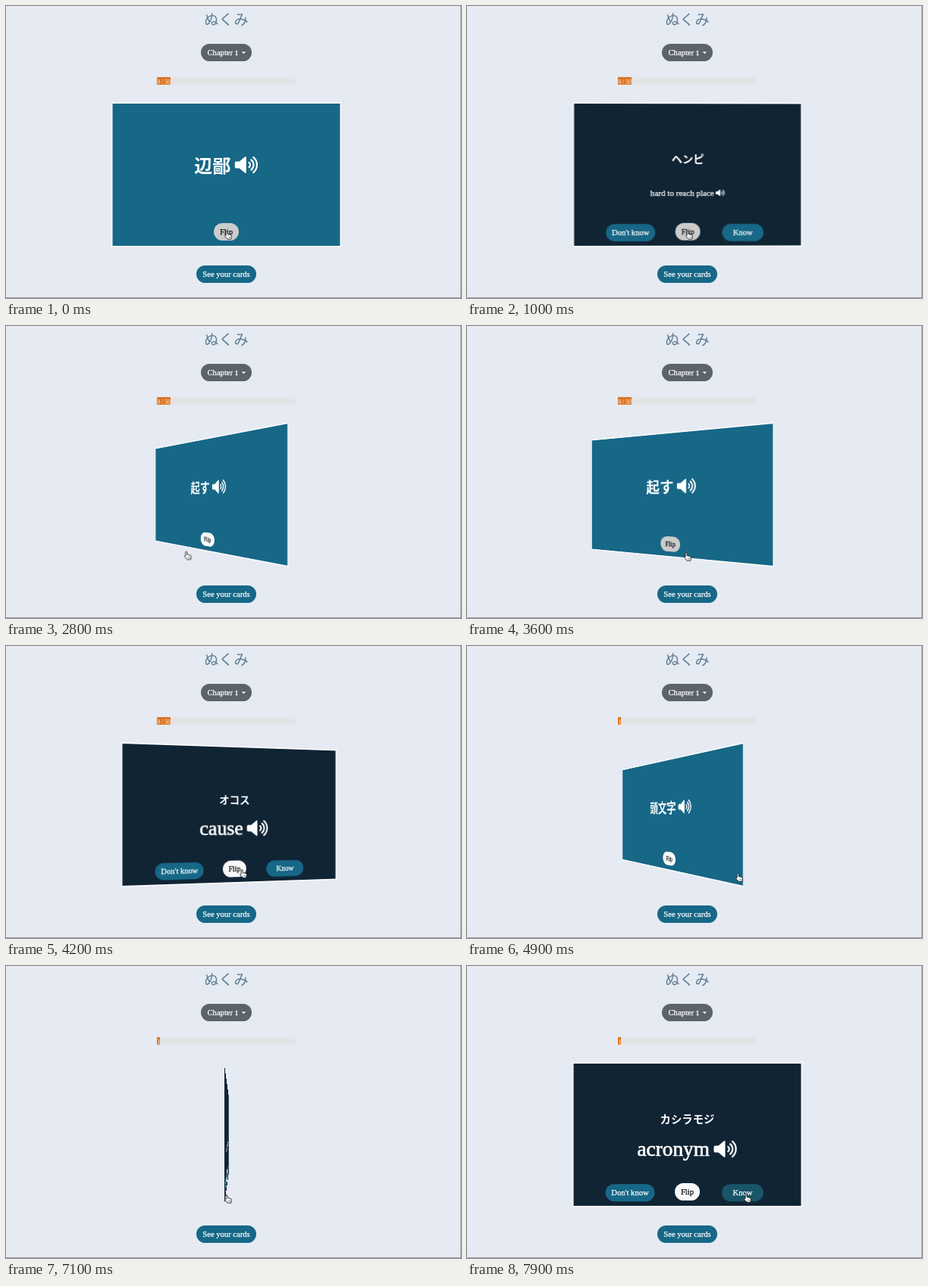
Write an HTML page that moves like this. It is 600 by 386 pixels and loops after 8000 ms.

```html
<!DOCTYPE html>
<html lang="ja">
<head>
<meta charset="utf-8">
<title>Flash cards</title>
<style>
  html, body { margin: 0; width: 100%; height: 100%; overflow: hidden; background: #e6eaf2; }
  .stage { position: absolute; left: 0; top: 0; width: 600px; height: 386px; overflow: hidden; background: #e6eaf2; }
  svg { display: block; }
  .page, .hand { position: absolute; left: 0; top: 0; }
  .hand { overflow: visible; }
  text { font-family: "Liberation Serif", "Times New Roman", serif; }
  .jp { font-family: "Noto Sans CJK JP", "Noto Sans CJK", "Noto Sans", sans-serif; }
  .medium { font-weight: 500; }
  .bold { font-weight: 700; }
  .track { position: absolute; left: 199px; top: 94px; width: 182px; height: 9.6px; background: #e2e4e7; overflow: hidden; }
  .bar { position: relative; width: 18.2px; height: 100%; background: #dd7420; overflow: hidden; }
  .bar span { position: absolute; left: .4px; top: 1.6px; white-space: nowrap; color: #fff; font: 7.6px/9.6px "Liberation Serif", serif; }
  .scene { position: absolute; left: 139px; top: 127px; width: 303px; height: 192px; perspective: 360px; }
  .card { position: absolute; inset: 0; transform-style: preserve-3d; transform-origin: center right; }
  /* A clear margin keeps the white edge crisp while the card turns. */
  .face { position: absolute; inset: -2px; backface-visibility: hidden; }
  .back { transform: rotateY(180deg); }
</style>
</head>
<body>
<div class="stage">
  <svg class="page" id="page" width="600" height="386" viewBox="0 0 600 386">
    <defs>
      <symbol id="speaker" viewBox="0 0 31 24" overflow="visible">
        <path fill="#fff" d="M1.8 7.5H6L13.2 1.4Q15 .3 15 2.4V21.6Q15 23.7 13.2 22.6L6 16.5H1.8Q0 16.5 0 14.7V9.3Q0 7.5 1.8 7.5Z"/>
        <path fill="none" stroke="#fff" stroke-width="2.2" stroke-linecap="round"
          d="M18.8 8.8a4.2 4.2 0 0 1 0 6.4M21.6 5.3a8.7 8.7 0 0 1 0 13.4M24.4 1.9a13.1 13.1 0 0 1 0 20.2"/>
      </symbol>
    </defs>
    <text class="jp medium" x="290.5" y="25.3" font-size="19.2" text-anchor="middle" fill="#5b7d92">ぬくみ</text>
    <path d="M599.5 0V386" stroke="#a5a8ae"/>
    <path d="M0 385.5H600" stroke="#9b9ea4"/>
  </svg>

  <div class="track"><div class="bar" id="bar">
    <span id="count0">0 / 50</span><span id="count1">1 / 50</span>
  </div></div>

  <div class="scene"><div class="card" id="card">
    <div class="face"><svg id="front" width="307" height="196" viewBox="137 125 307 196"></svg></div>
    <div class="face back"><svg id="back" width="307" height="196" viewBox="137 125 307 196"></svg></div>
  </div></div>

  <svg class="hand" id="hand" width="10" height="12" viewBox="0 0 10 12">
    <path fill="#fff" stroke="#222" stroke-width=".9" stroke-linejoin="round"
      d="M2.1 1.6C2.1.3 4.1.3 4.1 1.6V4.6L7.9 5.4Q9.6 5.8 9.4 7.4L8.8 11.2H4.1L.9 7.6C.2 6.6 1.1 5.8 2.1 6.7Z"/>
    <path fill="none" stroke="#444" stroke-width=".5" d="M5 7.6V9.6M6.4 7.6V9.6M7.7 7.6V9.6"/>
  </svg>
</div>

<script>
const LOOP = 8000, FLIP = 960, MID = 290.5;
const TEAL = '#176787', DARK_TEAL = '#185568', NAVY = '#112434';
const PALE = '#f8f9fa', GRAY = '#cbcbcb', BLACK = '#111';
const DONT_KNOW_AT = 2350, KNOW_AT = 4470;

const $ = id => document.getElementById(id);

function add(parent, tag, attrs, label) {
  const el = document.createElementNS('http://www.w3.org/2000/svg', tag);
  for (const key in attrs) el.setAttribute(key, attrs[key]);
  if (label) el.textContent = label;
  return parent.appendChild(el);
}

function button(parent, label, x, y, w, fill, ink = '#fff', shift = 0) {
  const h = 23;
  const rect = add(parent, 'rect', { x, y, width: w, height: h, rx: h / 2, fill });
  add(parent, 'text', {
    x: x + w / 2 + shift, y: y + h / 2 + 3.6, 'font-size': 10.6, 'text-anchor': 'middle',
    fill: ink, stroke: ink, 'stroke-width': .25
  }, label);
  return rect;
}

// A centred run of text followed by the speaker icon.
function spoken(parent, label, attrs, iconTop, scale, gap) {
  const text = add(parent, 'text', { fill: '#fff', ...attrs }, label);
  const w = text.getComputedTextLength();
  const x = MID - (w + gap + 31 * scale) / 2;
  text.setAttribute('x', x);
  add(parent, 'use', { href: '#speaker', x: x + w + gap, y: iconTop, width: 31 * scale, height: 24 * scale });
}

function face(parent, fill) {
  add(parent, 'rect', { x: 139, y: 127.3, width: 303, height: 191.4, fill: '#fafcfd' });
  add(parent, 'rect', { x: 140.5, y: 129, width: 300, height: 188, fill });
}

// Steps are [ms, value, easing to the next step].
const start = document.timeline.currentTime || 0;
function play(el, prop, steps) {
  const all = [...steps];
  if (all[0][0] > 0) all.unshift([0, all[0][1]]);
  all.push([LOOP, all[all.length - 1][1]]);
  const frames = all.map(([ms, value, easing = 'linear']) => ({ offset: ms / LOOP, [prop]: value, easing }));
  el.animate(frames, { duration: LOOP, iterations: Infinity }).startTime = start;
}

function show(el, from, to) {
  const steps = [[0, from ? 'hidden' : 'visible', 'step-end']];
  if (from) steps.push([from, 'visible', 'step-end']);
  if (to < LOOP) steps.push([to, 'hidden', 'step-end']);
  play(el, 'visibility', steps);
}

function fade(el, first, changes) {
  let now = first;
  const steps = [[0, now]];
  for (const [ms, next] of changes) {
    steps.push([ms, now], [ms + 150, next]);
    now = next;
  }
  play(el, 'fill', steps);
}

// Page
const page = $('page');
button(page, 'See your cards', 251, 343, 79, TEAL);
button(page, 'Chapter', 257, 50, 67, '#5c636a', '#fff', -8.2);
add(page, 'text', { x: 302, y: 65.1, 'font-size': 8, fill: '#fff', stroke: '#fff', 'stroke-width': .4 }, '1');
add(page, 'path', { d: 'M310.6 60.4h5.6l-2.8 2.9z', fill: '#fff' });

// Card faces
const front = $('front'), back = $('back');
face(front, TEAL);
face(back, NAVY);
const flipFront = button(front, 'Flip', 274, 287, 33, PALE, BLACK);
const flipBack = button(back, 'Flip', 274, 287, 33, PALE, BLACK);
const dontKnow = button(back, "Don't know", 182.5, 288.2, 65, TEAL);
const know = button(back, 'Know', 336, 288.2, 55, TEAL);

const big = { 'font-size': 27.3, y: 250.7, stroke: '#fff', 'stroke-width': .7 };
const small = { 'font-size': 11.08, y: 251, stroke: '#fff', 'stroke-width': .25 };
const deck = [
  ['辺鄙', 'ヘンピ', 'hard to reach place', 0, DONT_KNOW_AT],
  ['起す', 'オコス', 'cause', DONT_KNOW_AT, KNOW_AT],
  ['頭文字', 'カシラモジ', 'acronym', KNOW_AT, LOOP]
];
for (const [word, kana, meaning, from, to] of deck) {
  const ask = add(front, 'g', {}), answer = add(back, 'g', {});
  spoken(ask, word, { class: 'jp bold', 'font-size': 24, y: 219.8 }, 198, 1, 5.5);
  add(answer, 'text', {
    class: 'jp bold', x: MID, y: 207.7, 'font-size': 14.4, 'text-anchor': 'middle', fill: '#fff'
  }, kana);
  if (meaning.length > 10) spoken(answer, meaning, small, 242.3, .4, 2.4);
  else spoken(answer, meaning, big, 230, 1, 5.5);
  show(ask, from, to);
  show(answer, from, to);
}

// Flips
const UP = 'translateX(0%) rotateY(0deg)', OVER = 'translateX(-100%) rotateY(-180deg)';
const turns = [];
[100, DONT_KNOW_AT, 3489, KNOW_AT, 6815].forEach((ms, i) => {
  const [a, b] = i % 2 ? [OVER, UP] : [UP, OVER];
  turns.push([ms, a, 'ease'], [ms + FLIP, b]);
});
play($('card'), 'transform', turns);

// Progress
play($('bar'), 'width', [[KNOW_AT, '18.2px', 'ease'], [KNOW_AT + 600, '3.64px']]);
show($('count0'), 0, KNOW_AT);
show($('count1'), KNOW_AT, LOOP);

// Button states
fade(flipFront, GRAY, [[1000, PALE], [3080, GRAY], [4000, PALE], [6250, GRAY], [7300, PALE]]);
fade(flipBack, GRAY, [[2050, PALE]]);
fade(dontKnow, TEAL, [[2080, DARK_TEAL], [2700, TEAL]]);
fade(know, TEAL, [[4300, DARK_TEAL], [5300, TEAL], [7550, DARK_TEAL]]);

// Pointer, by the centre of the hand
const path = [
  [0, 293, 303], [1550, 293, 303], [2000, 253.5, 302], [2200, 224, 303], [2600, 224, 303],
  [3200, 291, 305], [3750, 291, 305], [4200, 313, 301], [4400, 359, 306], [5750, 359, 306],
  [6400, 293, 308], [7150, 293, 308], [7700, 370, 307]
];
play($('hand'), 'transform', path.map(([ms, x, y]) =>
  [ms, `translate(${x - 5}px, ${y - 6}px)`, 'ease-in-out']));
</script>
</body>
</html>
```
